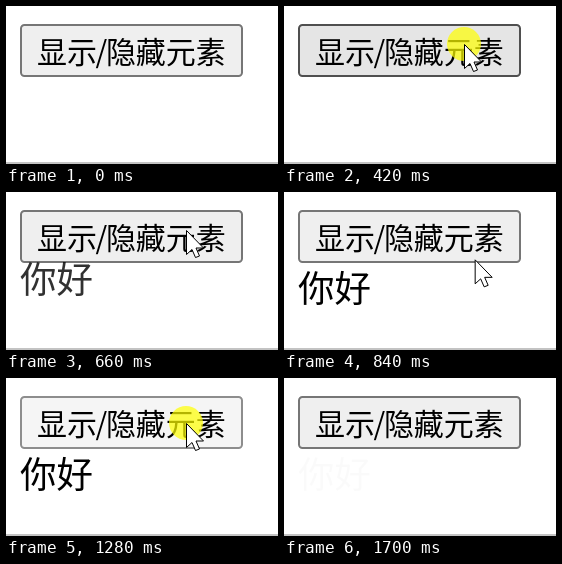
Animation, 272 px wide and 158 px high, one loop 2060 ms. Source, as an HTML page:

```html
<!DOCTYPE html>
<html lang="zh-CN">
<head>
<meta charset="utf-8">
<style>
  html, body { margin: 0; width: 100%; height: 100%; overflow: hidden; background: #fff; }
  svg { display: block; width: 272px; height: 158px; }
  text { font-family: "Noto Sans CJK SC", "Noto Sans CJK", sans-serif; }
</style>
</head>
<body>
<svg viewBox="0 0 272 158">
  <rect y="156" width="272" height="2" fill="#c3c3c3"/>
  <rect id="button" x="15" y="19" width="221" height="51" rx="3.5" stroke-width="2"/>
  <text x="125.5" y="56.5" font-size="30" text-anchor="middle">显示<tspan dx="-1.5">/</tspan><tspan dx="-1.5">隐藏元素</tspan></text>
  <text id="greeting" x="14" y="110" font-size="36.5">你好</text>
  <circle id="highlight" r="17" fill="#ff0" fill-opacity=".7"/>
  <path id="cursor" d="M.5 .5V24.5L6 19.5L9.5 27.5L13.5 26L10 18H17.5Z" fill="#fff" stroke="#000"/>
</svg>
<script>
const LOOP = 2060, FADE = 350, SHOW_AT = 485, HIDE_AT = 1350, DROP = 46;
const $ = id => document.getElementById(id);

// Pointer tip: time, x, y
const path = [
  [60, 230, 146], [180, 211, 98], [300, 186, 45], [360, 180, 38],
  [720, 180, 38], [900, 196, 82], [1080, 196, 82], [1280, 180, 45],
  [1340, 180, 44], [1400, 180, 44], [1500, 197, 75], [1640, 252, 147]
];
const styles = {
  normal: ["#efefef", "#767676"],
  hover: ["#e5e5e5", "#4f4f4f"],
  active: ["#f5f5f5", "#8d8d8d"]
};

const clamp = v => Math.min(1, Math.max(0, v));
const within = (t, from, to) => t >= from && t < to;

// CSS "ease": cubic-bezier(.25, .1, .25, 1)
function ease(p) {
  const bezier = (u, a, b) => 3 * u * (1 - u) ** 2 * a + 3 * u * u * (1 - u) * b + u ** 3;
  let low = 0, high = 1;
  for (let i = 0; i < 20; i++) {
    const mid = (low + high) / 2;
    if (bezier(mid, .25, .25) < p) low = mid; else high = mid;
  }
  return bezier(low, .1, 1);
}

function pointerAt(t) {
  const i = Math.max(1, path.findIndex(point => point[0] >= t));
  const [t0, x0, y0] = path[i - 1], [t1, x1, y1] = path[i];
  const p = clamp((t - t0) / (t1 - t0));
  return [x0 + (x1 - x0) * p, y0 + (y1 - y0) * p];
}

function stepTime(t) {
  if (t >= 1700) return 1700;
  const shift = t >= 1220 ? 20 : 0;
  return Math.min(Math.floor((t - shift) / 60) * 60 + shift, t < 1220 ? 1140 : 1640);
}

function place(id, x, y, visible) {
  $(id).setAttribute("transform", `translate(${x} ${y})`);
  $(id).setAttribute("visibility", visible ? "visible" : "hidden");
}

function draw(now) {
  const t = stepTime(now % LOOP);
  const [x, y] = pointerAt(Math.min(t, 1640));
  const visible = within(t, 60, 1700);
  const pressed = within(t, 420, 540) || within(t, 1280, 1340);
  place("cursor", x, y, visible);
  place("highlight", x, y, pressed);

  const active = within(t, 480, 540) || within(t, 1280, 1340);
  const hover = visible && y < 71 && !within(t, 600, 1080);
  const [fill, stroke] = styles[active ? "active" : hover ? "hover" : "normal"];
  $("button").setAttribute("fill", fill);
  $("button").setAttribute("stroke", stroke);

  const shown = ease(clamp((t - SHOW_AT) / FADE));
  const hidden = ease(clamp((Math.min(t, 1640) - HIDE_AT) / FADE));
  $("greeting").setAttribute("opacity", shown * (1 - hidden));
  $("greeting").setAttribute("transform", `translate(0 ${-DROP * (1 - shown)})`);
}

const start = performance.now();
function tick() {
  draw(performance.now() - start);
  requestAnimationFrame(tick);
}
tick();
</script>
</body>
</html>
```
